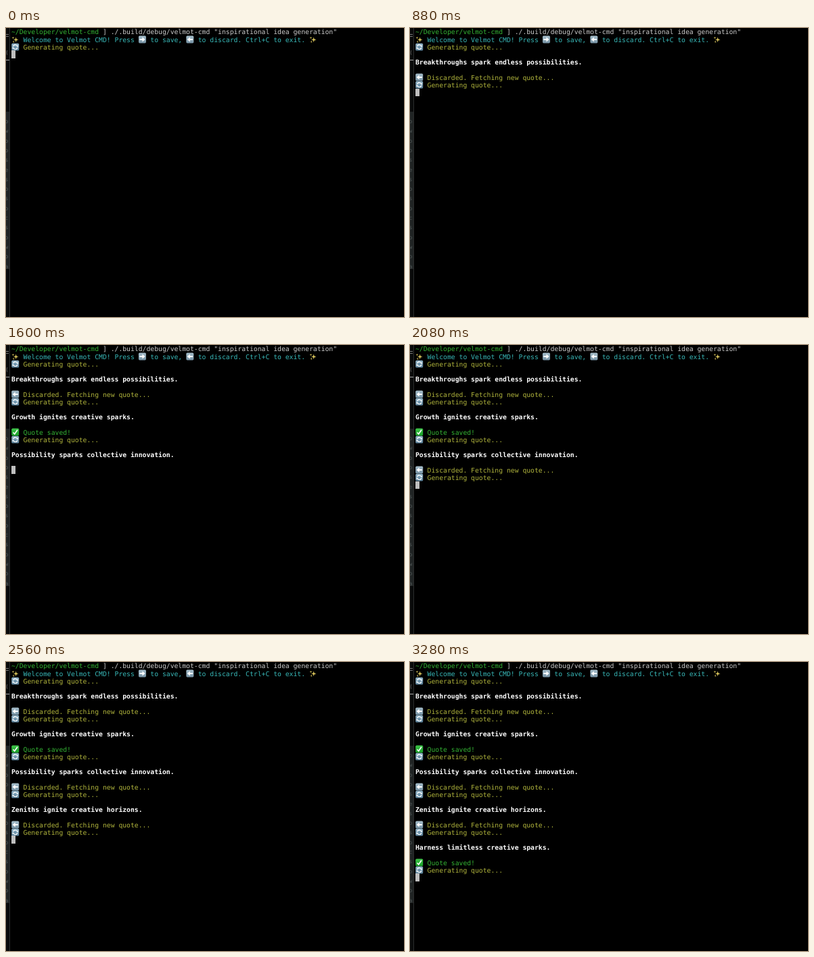
An HTML page with a canvas for the animation above (3360 ms loop, 588 px wide and 428 px high).

```html
<!DOCTYPE html>
<html lang="en">
<head>
<meta charset="utf-8">
<title>Terminal session</title>
<style>
html, body { margin: 0; width: 100%; height: 100%; overflow: hidden; background: #000; }
canvas { display: block; }
</style>
</head>
<body>
<canvas id="stage" width="588" height="428"></canvas>
<script>
const ctx = document.getElementById('stage').getContext('2d');
ctx.textRendering = 'geometricPrecision';

const LOOP = 3360, STEP = 80;
const LEFT = 8, TOP = 0.4, CELL = 5.866, ROW = 11.2, BASELINE = 8.95;
const FONT = '9.74px "DejaVu Sans Mono", monospace';
const GREEN = '#34b334', GREY = '#cacaca', CYAN = '#38b8b8', YELLOW = '#b0b43c', WHITE = '#fff';

const colX = col => LEFT + col * CELL;
const rowY = row => TOP + row * ROW;

function text(str, col, row, color, bold) {
  ctx.font = (bold ? 'bold ' : '') + FONT;
  ctx.fillStyle = color;
  const y = Math.round(rowY(row) + BASELINE);
  [...str].forEach((ch, i) => ctx.fillText(ch, colX(col + i), y));
}

// Icons are drawn in an 11 x 11 box at the given cell.
function icon(draw, col, row) {
  ctx.save();
  ctx.translate(colX(col), rowY(row));
  draw();
  ctx.restore();
}

function tile(top, bottom) {
  const fill = ctx.createLinearGradient(0, 0, 0, 11);
  fill.addColorStop(0, top);
  fill.addColorStop(1, bottom);
  ctx.fillStyle = fill;
  ctx.beginPath();
  ctx.roundRect(0.2, 0, 11, 10.8, 1.6);
  ctx.fill();
}

function polygon(points) {
  ctx.beginPath();
  points.forEach(([x, y]) => ctx.lineTo(x, y));
  ctx.closePath();
  ctx.fill();
}

function arrow(dir) {
  tile('#a5bdca', '#7693a5');
  ctx.translate(5.7, 5.4);
  ctx.scale(dir, 1);
  ctx.fillStyle = WHITE;
  polygon([[-4, -1.1], [0, -1.1], [0, -3.5], [4.1, 0], [0, 3.5], [0, 1.1], [-4, 1.1]]);
}
const right = () => arrow(1);
const left = () => arrow(-1);

function refresh() {
  tile('#8fb2c6', '#587f98');
  ctx.translate(5.7, 5.4);
  ctx.strokeStyle = ctx.fillStyle = WHITE;
  ctx.lineWidth = 1.2;
  for (let i = 0; i < 2; i++) {
    ctx.beginPath();
    ctx.arc(0, 0, 3.2, Math.PI * 1.08, Math.PI * 1.82);
    ctx.stroke();
    polygon([[1.6, -0.9], [4.2, -3], [4.2, -0.2]]);
    ctx.rotate(Math.PI);
  }
}

function check() {
  tile('#3fc54a', '#159d25');
  ctx.strokeStyle = WHITE;
  ctx.lineWidth = 1.6;
  ctx.beginPath();
  ctx.moveTo(2.5, 5.9);
  ctx.lineTo(4.7, 8.3);
  ctx.lineTo(8.9, 2.2);
  ctx.stroke();
}

function star(x, y, r) {
  polygon(Array.from({ length: 8 }, (_, i) => {
    const d = i % 2 ? r * 0.3 : r, a = i * Math.PI / 4;
    return [x + d * Math.cos(a), y + d * Math.sin(a)];
  }));
}

function sparkles() {
  ctx.fillStyle = '#e6d060';
  star(6.7, 5.8, 3.8);
  star(2.4, 2.8, 2);
  star(3.2, 8.8, 1.8);
}

// Sliver of the neighbouring window along the left edge.
function edge() {
  ctx.save();
  ctx.beginPath();
  ctx.rect(0, 0, 6, 428);
  ctx.clip();
  ctx.fillStyle = '#090a0a';
  ctx.fillRect(0, 0, 5, 428);
  ctx.fillStyle = '#202424';
  ctx.fillRect(0, 124, 5, 233);
  ctx.fillStyle = '#2b2d2d';
  ctx.fillRect(5, 0, 1, 428);
  ctx.fillStyle = '#777';
  ctx.fillRect(0, 9, 4, 1);
  ctx.fillRect(0, 12, 4, 1);
  ctx.fillStyle = '#aaa';
  ctx.fillRect(0, 47, 5, 1);
  ctx.font = '8px "DejaVu Sans Mono", monospace';
  ctx.fillStyle = '#666';
  ctx.fillText('(', -1, 39);
  ctx.fillStyle = '#505757';
  [...'owoosesosocsowoa'].forEach((ch, i) => ctx.fillText(ch, -1.5, 141 + i * 14.3));
  ctx.restore();
}

function header() {
  text('~/Developer/velmot-cmd', 0, 0, GREEN);
  text('] ./.build/debug/velmot-cmd "inspirational idea generation"', 23, 0, GREY);
  icon(sparkles, 0, 1);
  text('Welcome to Velmot CMD! Press', 3, 1, CYAN);
  icon(right, 32, 1);
  text('to save,', 35, 1, CYAN);
  icon(left, 44, 1);
  text('to discard. Ctrl+C to exit.', 47, 1, CYAN);
  icon(sparkles, 75, 1);
}

// ask: generation begins, show: quote appears, saved: answer given before this round
const rounds = [
  { ask: 0, show: 400, quote: 'Breakthroughs spark endless possibilities.' },
  { ask: 800, show: 1040, quote: 'Growth ignites creative sparks.' },
  { ask: 1360, show: 1600, saved: true, quote: 'Possibility sparks collective innovation.' },
  { ask: 1920, show: 2240, quote: 'Zeniths ignite creative horizons.' },
  { ask: 2480, show: 2880, quote: 'Harness limitless creative sparks.' },
  { ask: 3200, show: LOOP, saved: true, quote: '' }
];

function reply(saved, row) {
  icon(saved ? check : left, 0, row);
  text(saved ? 'Quote saved!' : 'Discarded. Fetching new quote...', 3, row, saved ? GREEN : YELLOW);
}

function caret(row) {
  const top = Math.floor(rowY(row));
  ctx.fillStyle = '#bfbfbf';
  ctx.fillRect(LEFT, top, 6, Math.round(rowY(row + 1)) - top);
}

function draw(t) {
  ctx.fillStyle = '#000';
  ctx.fillRect(0, 0, 588, 428);
  edge();
  header();
  let cursor = 3;
  rounds.forEach((round, i) => {
    if (t < round.ask) return;
    const row = 2 + i * 5;
    if (i) reply(round.saved, row - 1);
    icon(refresh, 0, row);
    text('Generating quote...', 3, row, YELLOW);
    cursor = row + 1;
    if (t >= round.show) {
      text(round.quote, 0, row + 2, WHITE, true);
      cursor = row + 4;
    }
  });
  caret(cursor);
}

const start = performance.now();
function tick() {
  const t = (performance.now() - start) % LOOP;
  draw(Math.floor(t / STEP) * STEP);
  requestAnimationFrame(tick);
}
tick();
</script>
</body>
</html>
```
